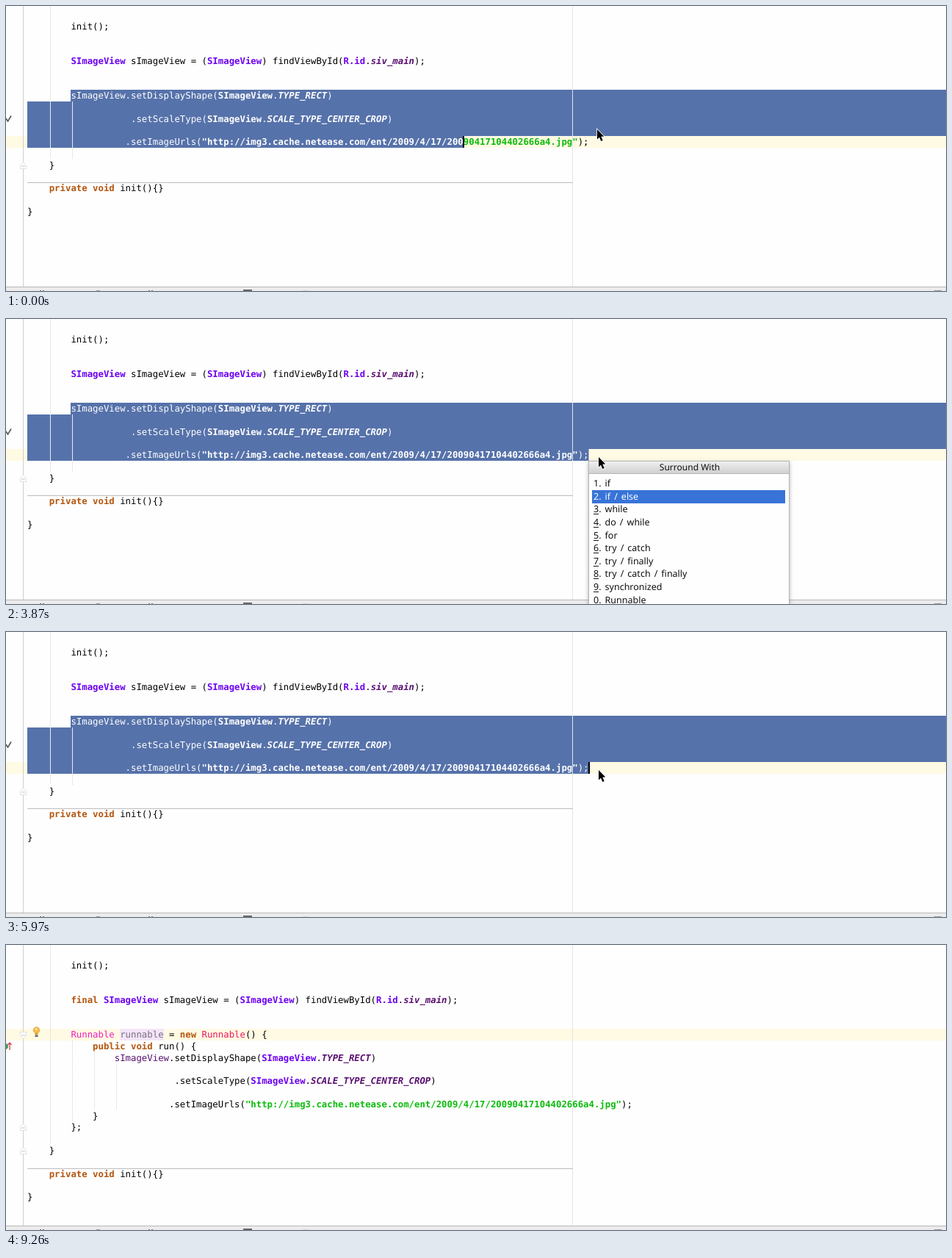
An HTML page with a canvas that plays this animation: 1280 px wide and 388 px high, repeating every 9400 ms.

```html
<!DOCTYPE html>
<html lang="en">
<head>
<meta charset="utf-8">
<title>Surround With Runnable</title>
<style>
html, body { margin: 0; width: 1280px; height: 388px; overflow: hidden; background: #fefefe; }
canvas { display: block; }
</style>
</head>
<body>
<canvas id="stage" width="1280" height="388"></canvas>
<script>
const ctx = document.getElementById("stage").getContext("2d");
ctx.textRendering = "geometricPrecision";

const LOOP = 9400;
const FONT_SIZE = 12.33, CELL = FONT_SIZE * 0.602;
const colX = col => 29 + col * CELL;
const rowY = row => Math.round(19.5 + row * 15.78);

// The first letter of each piece of code picks its style.
const STYLES = {
  n: ["", "#000"],
  k: ["bold", "#b4560f"],
  c: ["bold", "#6c00f0"],
  f: ["italic bold", "#590f70"],
  s: ["bold", "#0cbb0c"],
  v: ["", "#590f70"],
  p: ["", "#f01fc0"],
  r: ["", "#f0145f"],
  u: ["", "#77707c"]
};
const URL_TEXT = 's"http://img3.cache.netease.com/ent/2009/4/17/20090417104402666a4.jpg"';
const FIND = "cSImageView|n sImageView = (|cSImageView|n) findViewById(|cR.id|n.|fsiv_main|n);";
const SHAPE = "n.setDisplayShape(|cSImageView|n.|fTYPE_RECT|n)";
const SCALE = "n.setScaleType(|cSImageView|n.|fSCALE_TYPE_CENTER_CROP|n)";
const URLS = "n.setImageUrls(|" + URL_TEXT + "|n);";
const INIT = "kprivate void|n init(){}";

const BEFORE = [
  [0, 8, "ninit();"], [3, 8, FIND],
  [6, 8, "nsImageView|" + SHAPE], [8, 19, SCALE], [10, 18, URLS],
  [12, 4, "n}"], [14, 4, INIT], [16, 0, "n}"]
];
const AFTER = [
  [0, 8, "ninit();"], [3, 8, "kfinal |" + FIND],
  [6, 8, "pRunnable|n |urunnable|n = |knew |rRunnable|n() {"],
  [7, 12, "kpublic void|n run() {"],
  [8, 16, "vsImageView|" + SHAPE], [10, 27, SCALE], [12, 26, URLS],
  [13, 12, "n}"], [14, 8, "n};"], [16, 4, "n}"], [18, 4, INIT], [20, 0, "n}"]
];
const MENU = ["if", "if / else", "while", "do / while", "for", "try / catch",
  "try / finally", "try / catch / finally", "synchronized", "Runnable"];

// Time, value: each holds until the next one.
const MENU_STEPS = [[2820, 0], [3870, 1], [4020, 2], [4320, 3], [4470, 4], [4620, 5],
  [4770, 6], [4920, 7], [5220, 8], [5520, 9], [5970, -1]];
const CARET_STEPS = [[0, 1], [2370, 0], [5970, 1], [7910, 0], [8510, 1], [8960, 0]];
const POINTER_STEPS = [
  [0, ["arrow", 804, 167]],
  [150, ["beam", 815, 178]], [300, ["beam", 826, 182]], [440, ["beam", 832, 186]],
  [590, ["beam", 830, 187]], [740, ["beam", 822, 187]], [890, ["beam", 813, 187]],
  [1030, ["beam", 806, 187]],
  [2820, ["arrow", 806, 187]], [8510, ["arrow", 900, 187]], [8660, ["arrow", 1109, 186]],
  [8960, ["arrow", 1180, 250]], [9110, ["arrow", 1249, 360]], [9260, null]
];
const stepAt = (steps, t, initial) =>
  steps.reduce((value, [start, next]) => t >= start ? next : value, initial);

function rect(x, y, w, h, color) {
  ctx.fillStyle = color;
  ctx.fillRect(x, y, w, h);
}

function polygon(points, fill, stroke, width = 1) {
  ctx.beginPath();
  points.forEach(([x, y]) => ctx.lineTo(x, y));
  ctx.closePath();
  ctx.lineWidth = width;
  ctx.strokeStyle = stroke;
  ctx.fillStyle = fill;
  ctx.stroke();
  ctx.fill();
}

function line(points, color, width) {
  ctx.beginPath();
  points.forEach(([x, y]) => ctx.lineTo(x, y));
  ctx.lineWidth = width;
  ctx.strokeStyle = color;
  ctx.stroke();
}

function code(lines, { color, plainFrom = 99 } = {}) {
  for (const [row, col, source] of lines) {
    let at = col;
    for (const piece of source.split("|")) {
      const plain = row >= plainFrom && !"ks".includes(piece[0]);
      const [face, ink] = STYLES[plain ? "n" : piece[0]];
      ctx.font = `${face} ${FONT_SIZE}px "DejaVu Sans Mono", monospace`;
      ctx.fillStyle = color || ink;
      ctx.fillText(piece.slice(1), colX(at), rowY(row) + 12);
      at += piece.length - 1;
    }
  }
}

function guide(x, top, bottom, color = "#d2d2d2") {
  for (let y = top; y < bottom; y += 2) rect(x, y, 1, 1, color);
}

function foldMark(row, direction) {
  const y = rowY(row) + 8.5;
  polygon([[19.5, y + 4 * direction], [27.5, y + 4 * direction], [27.5, y - direction],
    [23.5, y - 5 * direction], [19.5, y - direction]], "#fff", "#c4c4c4");
  rect(21, y, 5, 1, "#c4c4c4");
}

function bulb(row) {
  const y = rowY(row) - 3;
  ctx.beginPath();
  ctx.arc(41.5, y + 5, 4.2, 0, 7);
  ctx.fillStyle = "#f8bd4a";
  ctx.fill();
  ctx.strokeStyle = "#d99a2b";
  ctx.lineWidth = 0.8;
  ctx.stroke();
  rect(40, y + 2, 2, 3, "#fde3a0");
  rect(39.5, y + 9, 4, 2, "#d99a2b");
  rect(39.5, y + 11, 4, 1, "#aaa");
  rect(39.5, y + 12, 4, 2, "#666");
}

function caret(row, col) {
  rect(Math.floor(colX(col) - 0.3), rowY(row), 2, 16, "#000");
}

function frameLines(separatorRow) {
  rect(23, 0, 1, 382, "#cfcfcf");
  rect(771, 0, 1, 382, "#e4e4e4");
  rect(29, rowY(separatorRow), 743, 1, "#bdbdbd");
}

function statusEdge() {
  rect(0, 382, 1280, 6, "#ececec");
  rect(0, 382, 1280, 1, "#b8b8b8");
  for (const x of [46, 50, 194, 198]) rect(x, 387, 2, 1, "#777");
  rect(123, 387, 5, 1, "#999");
  rect(323, 386, 12, 2, "#666");
  rect(404, 387, 8, 1, "#d8d8d8");
  rect(1264, 387, 10, 1, "#999");
}

function selectedCode(t) {
  const endCol = t < 150 ? 80 : 103;
  rect(0, 177, 1280, 16, "#fffae3");
  frameLines(14);
  guide(60, 0, 208);
  guide(90, 193, 208);
  code(BEFORE);

  ctx.save();
  ctx.beginPath();
  ctx.rect(88, 114, 1192, 16);
  ctx.rect(29, 130, 1251, 47);
  ctx.rect(29, 177, colX(endCol) - 29, 16);
  ctx.clip();
  rect(0, 114, 1280, 79, "#5672aa");
  rect(60, 130, 1, 63, "#e6eaf2");
  rect(90, 130, 1, 63, "#e6eaf2");
  rect(771, 114, 1, 79, "#dfe4ee");
  code(BEFORE, { color: "#fff" });
  ctx.restore();

  line([[0, 153], [2.5, 157], [7, 149.5]], "#555", 1.6);
  foldMark(12, 1);
  if (t >= 1930 && t < 2820) bulb(10);
  if (stepAt(CARET_STEPS, t)) caret(10, endCol);
}

function wrappedCode(t) {
  const highlighted = t >= 7460;
  rect(0, 114, 1280, 16, "#fffae3");
  rect(colX(17), 114, 8 * CELL, 16, "#f4e4f9");
  frameLines(18);
  guide(60, 0, 272);
  guide(90, 130, 240);
  guide(120, 146, 224);
  guide(150, 162, 224);
  code(AFTER, { plainFrom: highlighted ? 99 : 6 });

  foldMark(16, 1);
  if (highlighted) {
    foldMark(6, -1);
    foldMark(14, 1);
    ctx.beginPath();
    ctx.arc(-1, 138, 4, 0, 7);
    ctx.fillStyle = "#4c9a58";
    ctx.fill();
    line([[5, 143], [5, 133]], "#cf4048", 1.3);
    line([[2.5, 136], [5, 133], [7.5, 136]], "#cf4048", 1.2);
  }
  if (t >= 8060) bulb(6);
  if (stepAt(CARET_STEPS, t)) caret(6, 17);
}

function menu(selected) {
  ctx.save();
  ctx.shadowColor = "rgba(0,0,0,.3)";
  ctx.shadowBlur = 5;
  ctx.shadowOffsetY = 2;
  rect(793, 193, 274, 210, "#b4b4b4");
  ctx.restore();
  rect(794, 194, 272, 200, "#fefefe");
  const shade = ctx.createLinearGradient(0, 194, 0, 210);
  shade.addColorStop(0, "#f0f0f0");
  shade.addColorStop(1, "#d0d0d0");
  rect(794, 194, 272, 16, shade);
  rect(794, 210, 272, 1, "#b8b8b8");

  ctx.fillStyle = "#111";
  ctx.font = '12px "Noto Sans", sans-serif';
  ctx.textAlign = "center";
  ctx.fillText("Surround With", 931, 206);
  ctx.textAlign = "left";

  ctx.font = '12.5px "Noto Sans", sans-serif';
  ctx.wordSpacing = "1.8px";
  MENU.forEach((label, i) => {
    const top = Math.round(215.2 + i * 17.6);
    const ink = i === selected ? "#fff" : "#111";
    if (i === selected) rect(798, top, 263, 18, "#3874d8");
    ctx.fillStyle = ink;
    ctx.fillText(`${(i + 1) % 10}. ${label}`, 800, top + 13);
    if (selected === 0 || i > selected) rect(800, top + 15, 7, 1, ink);
  });
  ctx.wordSpacing = "0px";
}

function pointer([kind, x, y]) {
  ctx.save();
  ctx.translate(x, y);
  if (kind === "arrow") {
    polygon([[1, 1], [1, 14.5], [4, 11.7], [6.3, 17], [8.7, 16], [6.4, 10.8], [10.3, 10.5]],
      "#000", "#fff", 1.6);
  } else {
    line([[-3, -8.5], [-1, -8.5], [0.5, -7], [2, -8.5], [4, -8.5]], "#333", 1);
    line([[0.5, -7], [0.5, 7]], "#333", 1);
    line([[-3, 8.5], [-1, 8.5], [0.5, 7], [2, 8.5], [4, 8.5]], "#333", 1);
  }
  ctx.restore();
}

function draw() {
  const t = performance.now() % LOOP;
  rect(0, 0, 1280, 388, "#fefefe");
  if (t < 6120) selectedCode(t);
  else wrappedCode(t);
  statusEdge();

  const selected = stepAt(MENU_STEPS, t, -1);
  if (selected >= 0) menu(selected);
  const cursor = stepAt(POINTER_STEPS, t);
  if (cursor) pointer(cursor);
  requestAnimationFrame(draw);
}
draw();
</script>
</body>
</html>
```
